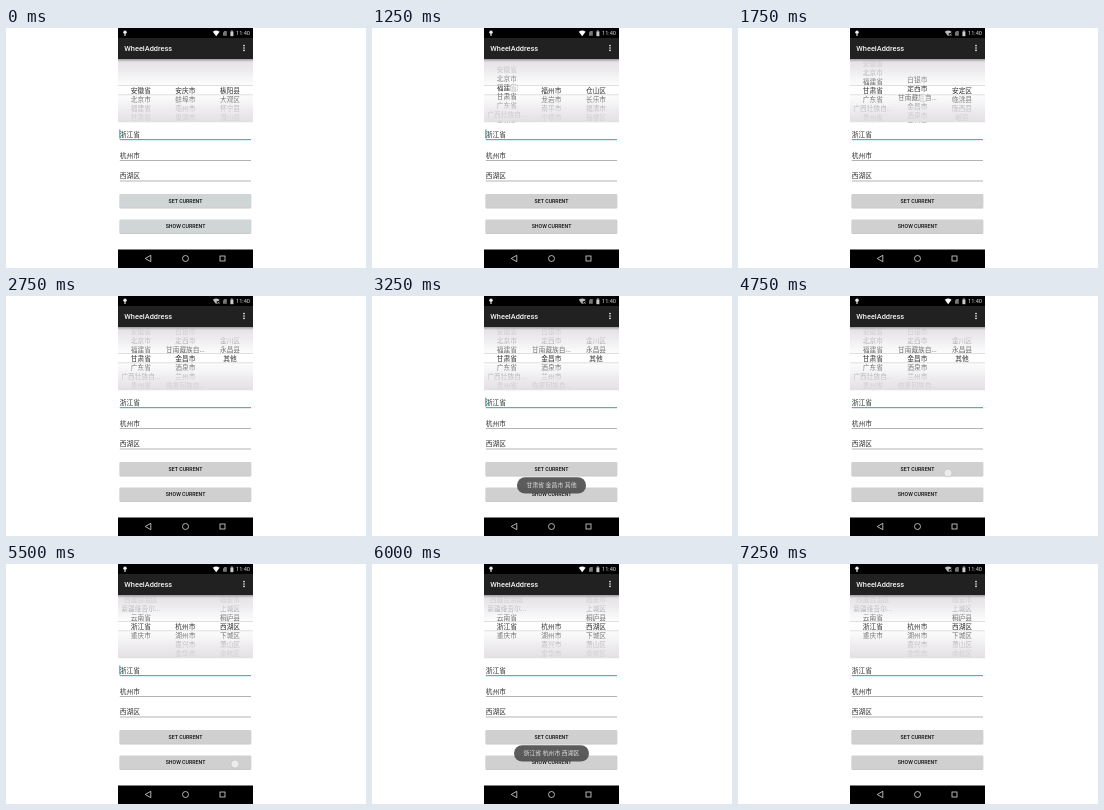
An HTML page with a canvas for the animation above (7.5 s loop, 360 by 240 pixels).

```html
<!DOCTYPE html>
<html lang="zh">
<head>
<meta charset="utf-8">
<title>Wheel picker</title>
<style>
html, body { margin: 0; width: 100%; height: 100%; overflow: hidden; background: #fff; }
canvas { display: block; }
</style>
</head>
<body>
<canvas id="stage" width="360" height="240"></canvas>
<script>
const ctx = document.getElementById('stage').getContext('2d');
const LOOP = 7500, STEP = 250;
const LEFT = 112, WIDTH = 135, MID = 179.5;
const WHEEL = { top: 31, bottom: 94.5, center: 62.3, row: 9 };
const FAMILY = 'Roboto, "Noto Sans CJK SC", "Noto Sans CJK", sans-serif';

const words = s => s.split(' ');
const PROVINCES = words('安徽省 北京市 福建省 甘肃省 广东省 广西壮族自... 贵州省 海南省 西藏自治区 新疆维吾尔... 云南省 浙江省 重庆市');
const REGIONS = {
  anhui: [words('安庆市 蚌埠市 亳州市 巢湖市'), words('枞阳县 大观区 怀宁县 潜山县')],
  beijing: [words('北京市'), words('昌平区 朝阳区 崇文区 大兴区')],
  fujian: [words('福州市 龙岩市 南平市 宁德市'), words('仓山区 长乐市 福清市 鼓楼区')],
  baiyin: [words('白银市 定西市 甘南藏族自... 金昌市 酒泉市 兰州市 临夏回族自...'), words('白银区 会宁县 景泰县 靖远县')],
  zhejiang: [words('杭州市 湖州市 嘉兴市 金华市'), words('江干区 临安市 上城区 桐庐县 西湖区 下城区 萧山区 余杭区')]
};
REGIONS.dingxi = [REGIONS.baiyin[0], words('安定区 临洮县 陇西县 岷县')];
REGIONS.jinchang = [REGIONS.baiyin[0], words('金川区 永昌县 其他')];

// step, region, wheel positions
const SCROLL = [
  [0, 'anhui', 0, 0, 0], [2, 'anhui', 0.45, 0, 0], [3, 'beijing', 1.1, 0, 0],
  [4, 'fujian', 1.75, 0, 0], [5, 'fujian', 2.33, 0, 0],
  [6, 'baiyin', 3, 0, 0], [7, 'dingxi', 3, 1.2, 0], [8, 'jinchang', 3, 3, 0],
  [9, 'jinchang', 3, 3, 1.3], [10, 'jinchang', 3, 3, 2],
  [20, 'zhejiang', 11, 0, 4]
];

const TOUCHES = {
  1: [142, 81], 2: [142, 77], 3: [142, 71], 4: [142, 65], 5: [142, 60],
  7: [185, 70], 9: [229, 68], 10: [210, 196], 19: [210, 177], 22: [229, 200]
};

const TOASTS = [
  { text: '甘肃省 金昌市 其他', from: 12, to: 15 },
  { text: '浙江省 杭州市 西湖区', from: 23, to: 27 }
];

const within = (step, from, to) => step >= from && step <= to;

function box(x, y, w, h, color) {
  ctx.fillStyle = color;
  ctx.fillRect(x, y, w, h);
}

function rounded(x, y, w, h, r, color) {
  ctx.fillStyle = color;
  ctx.beginPath();
  ctx.roundRect(x, y, w, h, r);
  ctx.fill();
}

function dot(x, y, r, color) {
  ctx.fillStyle = color;
  ctx.beginPath();
  ctx.arc(x, y, r, 0, Math.PI * 2);
  ctx.fill();
}

function shape(points, color) {
  ctx.fillStyle = color;
  ctx.beginPath();
  points.forEach(([x, y]) => ctx.lineTo(x, y));
  ctx.closePath();
  ctx.fill();
}

function label(text, x, y, size, color, align = 'center', weight = 400) {
  ctx.font = `${weight} ${size}px ${FAMILY}`;
  ctx.fillStyle = color;
  ctx.textAlign = align;
  ctx.textBaseline = 'alphabetic';
  ctx.fillText(text, x, y + size * 0.37);
}

function drawWifi(offline) {
  ctx.fillStyle = offline ? '#bbb' : '#fff';
  ctx.beginPath();
  ctx.moveTo(210.2, 8.2);
  ctx.lineTo(206.8, 3.8);
  ctx.quadraticCurveTo(210.2, 1.4, 213.6, 3.8);
  ctx.fill();
  if (!offline) return;
  box(210.8, 5, 3.4, 4, '#000');
  ctx.strokeStyle = '#ccc';
  ctx.lineWidth = 0.7;
  ctx.beginPath();
  ctx.moveTo(211.4, 5.6);
  ctx.lineTo(213.6, 7.8);
  ctx.moveTo(213.6, 5.6);
  ctx.lineTo(211.4, 7.8);
  ctx.stroke();
}

function drawBars(step) {
  box(LEFT, 0, WIDTH, 10, '#000');
  box(LEFT, 10, WIDTH, 21, '#212121');
  const shadow = ctx.createLinearGradient(0, 31, 0, 34);
  shadow.addColorStop(0, 'rgba(0,0,0,.3)');
  shadow.addColorStop(1, 'rgba(0,0,0,0)');
  box(LEFT, 31, WIDTH, 3, shadow);

  dot(119, 4.3, 1.7, '#eee');
  box(118.4, 5.5, 1.2, 2.5, '#ddd');
  drawWifi(within(step, 6, 16) || within(step, 26, 29));
  shape([[218.4, 3], [220.8, 3], [220.8, 7.8], [217, 7.8], [217, 4.4]], '#777');
  box(224.4, 3.4, 3, 4.8, '#ccc');
  box(225.2, 2.4, 1.4, 1, '#ccc');
  label('11:40', 244, 5.3, 5.6, '#ddd', 'right', 400);

  label('WheelAddress', 118.3, 20.2, 7.4, '#f4f4f4', 'left', 500);
  [17.6, 20, 22.4].forEach(y => dot(238, y, 0.8, '#fff'));

  box(LEFT, 221.5, WIDTH, 18.5, '#000');
  ctx.strokeStyle = '#ddd';
  ctx.lineWidth = 0.8;
  ctx.beginPath();
  ctx.moveTo(139.2, 230.5);
  ctx.lineTo(144.8, 227.3);
  ctx.lineTo(144.8, 233.7);
  ctx.closePath();
  ctx.stroke();
  ctx.beginPath();
  ctx.arc(MID, 230.5, 3, 0, Math.PI * 2);
  ctx.stroke();
  ctx.strokeRect(214, 228, 5, 5);
}

function drawWheel(items, position, x) {
  items.forEach((item, i) => {
    const y = WHEEL.center + (i - position) * WHEEL.row;
    if (y > 26 && y < 99) label(item, x, y, 6.7, '#2c2c2c');
  });
}

function shade(edge, inner) {
  const g = ctx.createLinearGradient(0, edge, 0, inner);
  g.addColorStop(0, 'rgba(225,222,226,.95)');
  g.addColorStop(0.5, 'rgba(234,232,235,.8)');
  g.addColorStop(1, 'rgba(240,239,241,.2)');
  box(LEFT, Math.min(edge, inner), WIDTH, Math.abs(edge - inner), g);
}

function drawWheels(step) {
  const [, region, ...positions] = SCROLL.findLast(k => k[0] <= step);
  ctx.save();
  ctx.beginPath();
  ctx.rect(LEFT, WHEEL.top, WIDTH, WHEEL.bottom - WHEEL.top);
  ctx.clip();
  [PROVINCES, ...REGIONS[region]].forEach((items, i) =>
    drawWheel(items, positions[i], 134.8 + i * 44.6));
  shade(WHEEL.top, 57);
  shade(WHEEL.bottom, 67);
  box(LEFT, 57, WIDTH, 0.7, '#d2d2d2');
  box(LEFT, 66.5, WIDTH, 0.7, '#d2d2d2');
  ctx.restore();
}

function drawForm(step) {
  const fields = [['浙江省', 106.2, 111], ['杭州市', 127.2, 132], ['西湖区', 147.8, 152.7]];
  fields.forEach(([text, y, line], i) => {
    label(text, 113.8, y, 6.7, '#2c2c2c', 'left');
    box(113.8, line, 131.2, i ? 0.6 : 1.2, i ? '#808080' : '#4db6ac');
  });
  const blink = step % 4 < 2;
  if (step < 20 ? blink : !blink) box(113.4, 101.5, 0.9, 9, '#009688');

  const color = step ? '#d0d0d0' : '#d0d5d5';
  [['SET CURRENT', 166], ['SHOW CURRENT', 191.5]].forEach(([text, y]) => {
    rounded(113.6, y + 0.5, 131.6, 13.9, 1, '#c4c4c4');
    rounded(113.6, y, 131.6, 13.8, 1, color);
    label(text, MID, y + 7, 5.25, '#111', 'center', 500);
  });
}

function drawToast(step) {
  const toast = TOASTS.find(t => within(step, t.from, t.to));
  if (!toast) return;
  const edge = step === toast.from || step === toast.to;
  ctx.font = `400 5.9px ${FAMILY}`;
  const w = ctx.measureText(toast.text).width + 19;
  ctx.globalAlpha = edge ? 0.5 : 1;
  rounded(MID - w / 2, 181.2, w, 16.4, 8.2, 'rgba(80,80,80,.93)');
  label(toast.text, MID, 189.3, 5.9, '#ddd');
  ctx.globalAlpha = 1;
}

function drawTouch(step) {
  if (!TOUCHES[step]) return;
  const [x, y] = TOUCHES[step];
  dot(x, y, 4, 'rgba(245,245,245,.75)');
  ctx.strokeStyle = 'rgba(150,150,150,.5)';
  ctx.lineWidth = 0.6;
  ctx.stroke();
}

function draw(now) {
  const step = Math.floor((now % LOOP) / STEP);
  box(0, 0, 360, 240, '#fff');
  drawWheels(step);
  drawForm(step);
  drawBars(step);
  drawToast(step);
  drawTouch(step);
  requestAnimationFrame(draw);
}
requestAnimationFrame(draw);
</script>
</body>
</html>
```
